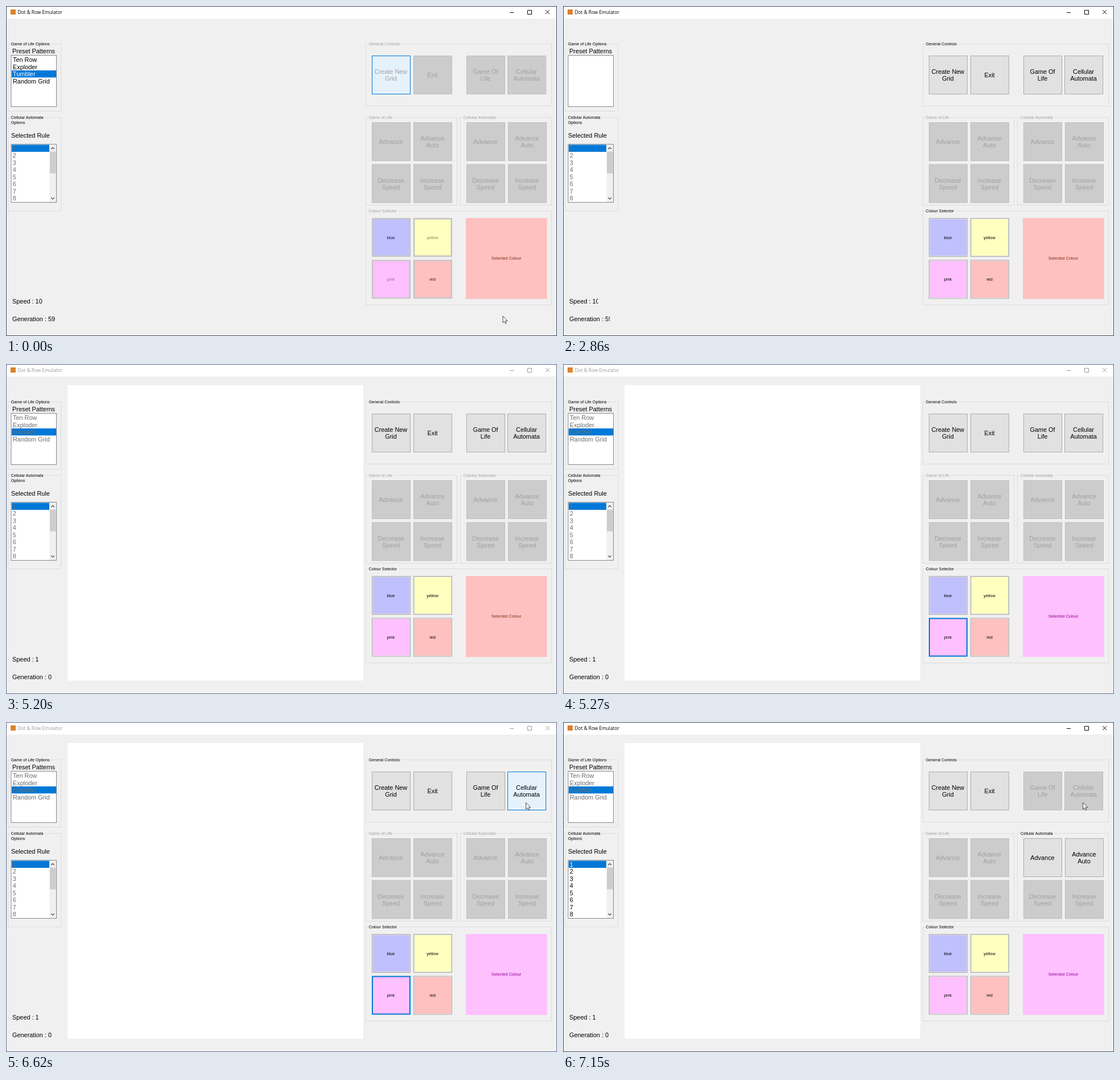
Write an HTML page that moves like this. It is 967x579 px and loops after 8000 ms.

```html
<!DOCTYPE html>
<html lang="en">
<head>
<meta charset="utf-8">
<title>Dot &amp; Row Emulator</title>
<style>
html, body { margin: 0; width: 100%; height: 100%; overflow: hidden; background: #f0f0f0; }
svg { display: block; position: absolute; left: 0; top: 0; }
text { font-family: "Liberation Sans", Arial, sans-serif; font-size: 10.9px; white-space: pre; }
.small { font-size: 7.2px; }
.tag { font-size: 7.4px; }
.title { font-family: "Open Sans", "Noto Sans", sans-serif; font-size: 8.3px; }
</style>
</head>
<body>
<svg width="967" height="579" viewBox="0 0 967 579">
  <g id="ui"></g>
  <path id="cursor" d="M0 0V11.6L2.7 9.1L4.5 13.3L6.3 12.5L4.5 8.4H8.2Z" fill="#fff" stroke="#222" stroke-width=".8"/>
</svg>
<script>
const LOOP = 8000, STEP = 70;
const BG = '#f0f0f0', BLUE = '#0078d7', DIM = '#a0a0a0', GREY = '#6d6d6d';
const ui = document.getElementById('ui');
const cursor = document.getElementById('cursor');

// Moments at which the window is repainted.
const CLEAR = 2860, REFILL = 3260, BLUR = 5200, PINK = 5270, HOVER = 6550, PRESS = 7080, START = 7150;
const MARKS = [0, CLEAR, REFILL, BLUR, PINK, HOVER, PRESS, START];

// Pointer moves: start time, steps, from, to, time it is shown until.
const MOVES = [
  [0, 5, [872, 544], [910, 555], 420],
  [5730, 4, [910, 555], [921, 223], 6270],
  [6270, 5, [921, 223], [912.5, 141.5], LOOP]
];

const rect = (x, y, w, h, fill) =>
  `<rect x="${x}" y="${y}" width="${w}" height="${h}" fill="${fill}"/>`;
const frame = (x, y, w, h, fill, line, wide = 1) =>
  `<rect x="${x + wide / 2}" y="${y + wide / 2}" width="${w - wide}" height="${h - wide}" fill="${fill}" stroke="${line}" stroke-width="${wide}"/>`;
const text = (x, y, s, fill = '#000', cls = '', anchor = 'start') =>
  `<text x="${x}" y="${y}" fill="${fill}" class="${cls}" text-anchor="${anchor}">${s}</text>`;
const stroke = (d, line, wide = 1) =>
  `<path d="${d}" fill="none" stroke="${line}" stroke-width="${wide}"/>`;

function group(x, y, w, h, label, gap, on = true) {
  const lines = label.split('|');
  return frame(x, y, w, h, 'none', '#dcdcdc') + rect(x + 4, y - 2, gap, 5, BG) +
    lines.map((s, i) => text(x + 5.7, y + 3 + i * 9, s, on ? '#000' : DIM, 'small')).join('');
}

const LOOKS = {
  on: ['#e1e1e1', '#adadad', '#000'],
  off: ['#cccccc', '#bfbfbf', DIM],
  hover: ['#e5f1fb', BLUE, '#000'],
  busy: ['#e5f1fb', BLUE, DIM],
  press: ['#cce4f7', '#005499', '#000']
};

function button(x, y, label, look) {
  const [fill, line, ink] = LOOKS[look];
  const lines = label.split('|');
  const base = y + 38.2 - (lines.length - 1) * 6.2;
  return frame(x, y, 68, 68, fill, line) +
    lines.map((s, i) => text(x + 33.5, base + i * 12.4, s, ink, '', 'middle')).join('');
}

function swatch(x, y, label, fill, dimInk, on, focus) {
  const edge = focus ? frame(x, y, 68, 68, fill, BLUE, 2)
    : frame(x, y, 68, 68, fill, on ? '#adadad' : '#bfbfbf') +
      frame(x + 1, y + 1, 66, 66, fill, on ? '#dcdcdc' : '#c8c8c8', on ? 1 : 1.5);
  return edge + text(x + 33.5, y + 36.8, label, on ? '#000' : dimInk, 'tag', 'middle');
}

function titleBar(active) {
  const ink = active ? '#000' : '#999';
  return rect(0, 0, 967, 22, '#fff') + rect(8, 6, 9, 9, '#d9822b') +
    text(20.5, 13.8, 'Dot &amp; Row Emulator', ink, 'title') +
    stroke('M884 11.5H891M915.5 7.5H922.5V14.5H915.5ZM947 7.2L954 14.2M954 7.2L947 14.2', ink);
}

function patterns(t) {
  let s = frame(8.5, 86, 80.5, 91, '#fff', '#82878f');
  if (t >= CLEAR && t < REFILL) return s;
  const on = t < CLEAR;
  s += rect(10, 113, 78, 12.4, BLUE);
  ['Ten Row', 'Exploder', 'Tumbler', 'Random Grid'].forEach((name, i) => {
    s += text(12, 98.4 + i * 12.45, name, !on ? GREY : i === 2 ? '#fff' : '#000');
  });
  return s;
}

function rules(on) {
  let s = frame(8.5, 242, 80.5, 103, '#fff', '#82878f') + rect(10, 243.5, 66, 12.4, BLUE);
  for (let i = 0; i < 8; i++)
    s += text(11.7, 253.9 + i * 12.45, i + 1, !on ? GREY : i ? '#000' : '#fff');
  return s + rect(76.5, 243, 11.5, 101, BG) + rect(77, 255.5, 10.5, 38, '#cdcdcd') +
    stroke('M79.3 251L82 248.3L84.7 251M79.3 336.2L82 338.9L84.7 336.2', '#404040', 1.2);
}

function counters(t) {
  const old = t < REFILL;
  let s = text(11, 522.3, 'Speed : ' + (old ? 10 : 1)) +
    text(11, 553.3, 'Generation : ' + (old ? 59 : 0));
  if (old && t >= CLEAR) s += rect(61.5, 511, 8, 15, BG) + rect(82.3, 542, 8, 15, BG);
  return s;
}

function speedPanel(x, right, on) {
  const look = on ? 'on' : 'off';
  return button(x, 204, 'Advance', look) + button(right, 204, 'Advance|Auto', look) +
    button(x, 277.5, 'Decrease|Speed', 'off') + button(right, 277.5, 'Increase|Speed', 'off');
}

function draw(t) {
  const active = t < BLUR || t >= PRESS;
  const ready = t >= CLEAR, running = t >= START, pink = t >= PINK;
  const main = ready ? 'on' : 'off';
  const mode = running ? 'off' : main;
  const auto = running || t < HOVER ? mode : t < PRESS ? 'hover' : 'press';

  ui.innerHTML = rect(0, 0, 967, 579, BG) + titleBar(active) +
    group(3, 66, 94, 119, 'Game of Life Options', 71) +
    text(11, 83, 'Preset Patterns') + patterns(t) +
    group(3, 195, 94, 165, 'Cellular Automata|Options', 60) +
    text(9, 231, 'Selected Rule') + rules(running) + counters(t) +
    (t >= BLUR ? rect(108, 37, 519, 518.5, '#fff') : '') +
    group(631, 66, 327, 110, 'General Controls', 58, ready) +
    button(642, 87, 'Create New|Grid', ready ? 'on' : 'busy') +
    button(715, 87, 'Exit', main) +
    button(808, 87, 'Game Of|Life', mode) +
    button(880, 87, 'Cellular|Automata', auto) +
    group(631, 195, 161, 155, 'Game of Life', 45, false) + speedPanel(642, 715, false) +
    group(797, 195, 161, 155, 'Cellular Automata', 60, running) + speedPanel(808, 881, running) +
    group(631, 359, 327, 166, 'Colour Selector', 54, ready) +
    swatch(642, 372, 'blue', '#c0c0ff', '#101050', ready) +
    swatch(715, 372, 'yellow', '#ffffc0', '#948060', ready) +
    swatch(642, 445.5, 'pink', '#ffc0ff', '#987098', ready, pink && t < PRESS) +
    swatch(715, 445.5, 'red', '#ffc0c0', '#501010', ready) +
    rect(807, 372, 142.5, 142, pink ? '#ffc0ff' : '#ffc0c0') +
    text(878, 445.3, 'Selected Colour', pink ? '#900090' : '#803010', 'tag', 'middle') +
    frame(0, 0, 967, 579, 'none', active ? '#44465e' : '#626788');
}

function point(t) {
  const move = MOVES.find(([at, , , , until]) => t >= at && t < until);
  cursor.style.visibility = move ? 'visible' : 'hidden';
  if (!move) return;
  const [at, n, from, to] = move;
  const k = Math.min(1, Math.floor((t - at) / STEP) / n);
  const e = (1 - Math.cos(Math.PI * k)) / 2;
  const [x, y] = from.map((v, i) => v + (to[i] - v) * e);
  cursor.setAttribute('transform', `translate(${x} ${y})`);
}

let shown = -1;
const begin = performance.now();
function tick(now) {
  const t = Math.max(0, now - begin) % LOOP;
  const mark = MARKS.filter(m => m <= t).pop();
  if (mark !== shown) draw(shown = mark);
  point(t);
  requestAnimationFrame(tick);
}
tick(begin);
</script>
</body>
</html>
```
